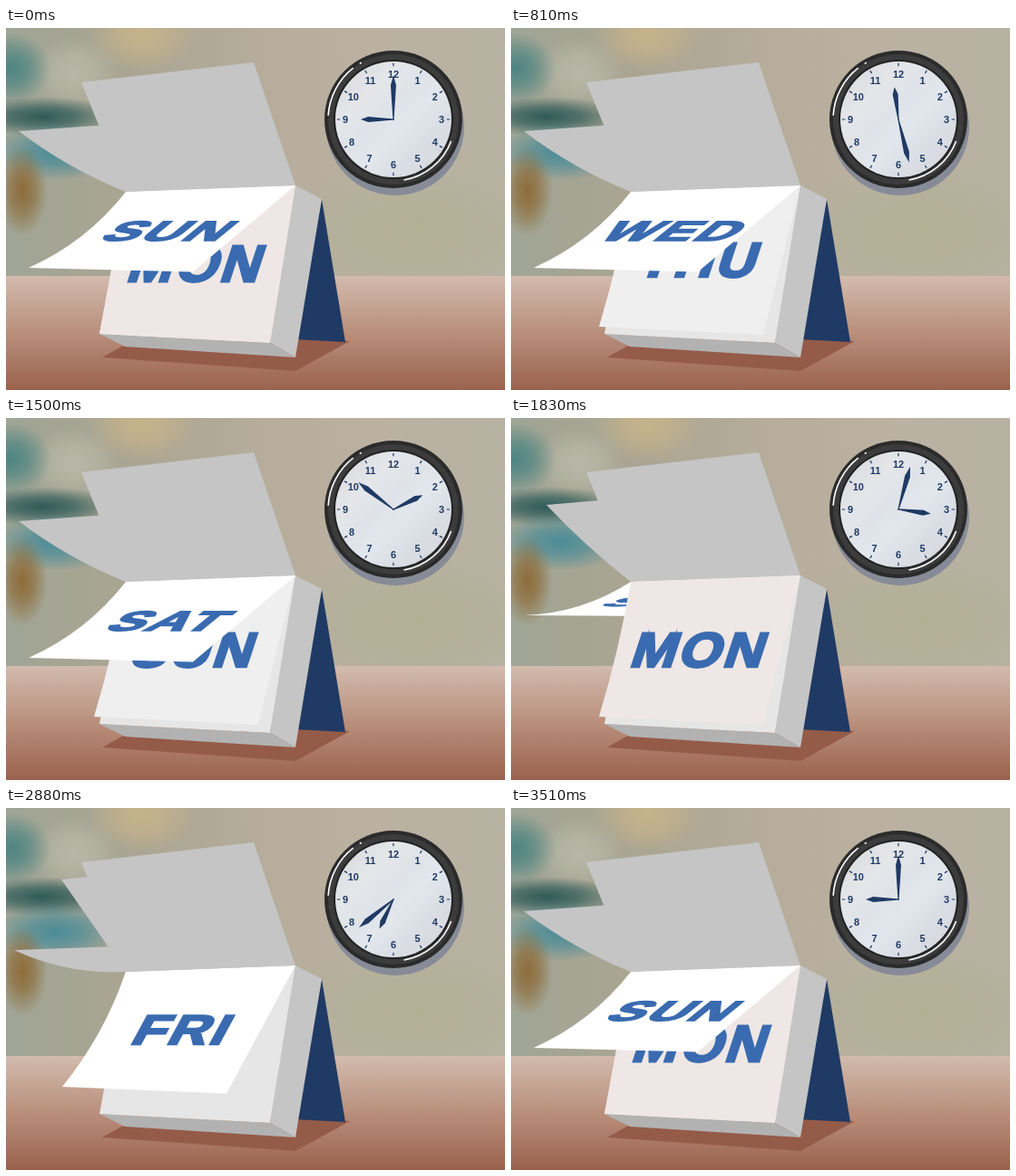
Write an HTML page with a canvas that moves like this. It is 550 by 400 pixels and loops after 3.54 s.

```html
<!DOCTYPE html>
<html lang="en">
<head>
<meta charset="utf-8">
<title>Days passing</title>
<style>
html, body { margin: 0; width: 100%; height: 100%; overflow: hidden; }
canvas { display: block; }
</style>
</head>
<body>
<canvas id="stage" width="550" height="400"></canvas>
<script>
const STEP = 30, STEPS = 118, POSES = 29, DAY_POSES = 4;
const NAVY = '#1f3a64', INK = '#3a6bb0', GRAY = '#c5c5c5', PINK = '#efe7e5';
const DAYS = ['MON', 'TUE', 'WED', 'THU', 'FRI', 'SAT', 'SUN'];
const HINGE_L = [132, 181], HINGE_R = [319, 174];
const CLOCK = { x: 427, y: 101 };

// Path of a sheet's free left corner, one point per pose
const CORNERS = [
  [103, 338], [97, 330], [82, 322], [62, 308], [50, 295], [25, 265],
  [15, 218], [9, 157], [9, 133], [14, 114], [39, 96], [61, 79]
];
const FIRST_BACK = 7;

const stage = document.getElementById('stage').getContext('2d');
const backdrop = document.createElement('canvas');
backdrop.width = 550;
backdrop.height = 400;

function polygon(c, fill, ...points) {
  c.fillStyle = fill;
  c.beginPath();
  points.forEach(p => c.lineTo(...p));
  c.fill();
}

function disc(c, x, y, r, fill) {
  c.fillStyle = fill;
  c.beginPath();
  c.arc(x, y, r, 0, 2 * Math.PI);
  c.fill();
}

function arc(c, r, from, to, width) {
  c.lineWidth = width;
  c.beginPath();
  c.arc(CLOCK.x, CLOCK.y, r, from, to);
  c.stroke();
}

function gradient(c, line, ...colors) {
  const g = c.createLinearGradient(...line);
  colors.forEach((color, i) => g.addColorStop(i / (colors.length - 1), color));
  return g;
}

function blob(c, color, x, y, rx, ry) {
  const g = c.createRadialGradient(0, 0, 0, 0, 0, 1);
  g.addColorStop(0, color);
  g.addColorStop(.45, color + 'b0');
  g.addColorStop(1, color + '00');
  c.save();
  c.translate(x, y);
  c.scale(rx, ry);
  disc(c, 0, 0, 1, g);
  c.restore();
}

function drawRoom(c) {
  c.fillStyle = gradient(c, [0, 0, 550, 0], '#a0a595', '#aaa592', '#b5ac9b', '#bab1a1', '#b8b2a2');
  c.fillRect(0, 0, 550, 274);
  blob(c, '#b1b095', 455, 225, 150, 80);
  blob(c, '#c6b38a', 150, 8, 60, 40);
  blob(c, '#b9b8a8', 75, 50, 50, 40);
  blob(c, '#4d8582', 5, 45, 45, 40);
  blob(c, '#2f5b58', 40, 98, 85, 22);
  blob(c, '#4b8c98', 55, 137, 70, 32);
  blob(c, '#8d6c3a', 18, 180, 28, 50);
  c.fillStyle = gradient(c, [0, 274, 0, 400], '#d2bbad', '#b98f7c', '#9a624d');
  c.fillRect(0, 274, 550, 126);
}

function drawClock(c) {
  const { x, y } = CLOCK;
  disc(c, x + 2, y + 8, 76, '#868b97');
  disc(c, x, y, 76, '#2b2b2b');
  disc(c, x, y, 72, '#3c3c3c');
  disc(c, x, y, 66, '#222');
  disc(c, x, y, 64, gradient(c, [380, 55, 474, 147],
    '#dcdee2', '#e4e6e9', '#dfe3e8', '#e2e7ed', '#dadee5', '#d8dade'));
  c.strokeStyle = '#fff';
  arc(c, 72, 3.2, 4.05, 1.6);
  arc(c, 72, 4.17, 4.2, 1.6);
  arc(c, 68, .36, 1.4, 1.6);
  c.strokeStyle = c.fillStyle = NAVY;
  c.font = 'bold 11px "Liberation Sans", Arial, sans-serif';
  c.textAlign = 'center';
  for (let h = 1; h <= 12; h++) {
    const angle = h * Math.PI / 6 - Math.PI / 2;
    const r = 55 - 2 * String(h).length;
    arc(c, 60.5, angle - .01, angle + .01, 3.5);
    c.fillText(h, x + Math.cos(angle) * r, y + Math.sin(angle) * 50 + 4);
  }
}

function drawCalendar(c) {
  polygon(c, '#945b49', [106, 364], [131, 350], [323, 343], [379, 346], [319, 379]);
  polygon(c, NAVY, [348, 189], [374, 347], [318, 344]);
  polygon(c, GRAY, [83, 60], [273, 38], HINGE_R, HINGE_L);
  polygon(c, GRAY, HINGE_R, [348, 189], [319, 364], [291, 348]);
  polygon(c, '#b2b2b2', [103, 338], [291, 348], [319, 364], [131, 352]);
  polygon(c, '#e6e6e6', HINGE_L, HINGE_R, [291, 348], [103, 338]);
}

function sheetColor(day, age) {
  if (age >= FIRST_BACK) return GRAY;
  if (day === 0 && age < 2) return PINK;
  const light = Math.min(255, 231 + 8 * age);
  return `rgb(${light}, ${light}, ${light})`;
}

function drawSheet(c, day, age) {
  const [lx, ly] = CORNERS[age];
  const isFront = age < FIRST_BACK;
  const rx = lx + (age ? 181 : 188);
  const ry = ly + (ly - 200) * (isFront ? .07 : .15);

  // The left edge bows out at right angles to its chord
  const dx = lx - HINGE_L[0], dy = ly - HINGE_L[1];
  const bow = 17 * Math.sin(Math.PI * age / 11) / Math.hypot(dx, dy);
  const bowX = dy * bow, bowY = -dx * bow;

  c.fillStyle = sheetColor(day, age);
  c.beginPath();
  c.moveTo(...HINGE_L);
  c.quadraticCurveTo(HINGE_L[0] + dx / 2 + bowX, HINGE_L[1] + dy / 2 + bowY, lx, ly);
  c.lineTo(rx, ry);
  c.lineTo(...HINGE_R);
  c.fill();
  if (isFront) {
    const top = [(HINGE_L[0] + HINGE_R[0]) / 2, (HINGE_L[1] + HINGE_R[1]) / 2];
    const fall = [(lx + rx) / 2 - top[0], (ly + ry) / 2 - top[1]];
    const along = .5 - .002 * age * age;
    drawLabel(c, DAYS[day], top[0] + fall[0] * along + bowX / 2,
      top[1] + fall[1] * along + bowY / 2, fall);
  }
}

// Lays the word on the plane of a sheet that falls along the given vector
function drawLabel(c, word, x, y, [fallX, fallY]) {
  const squash = fallY / 175;
  const shear = Math.max(.33, -fallX / fallY);
  c.save();
  c.transform(1, 0, -shear * squash, squash, x, y);
  c.font = 'bold 60px "Liberation Sans", Arial, sans-serif';
  c.letterSpacing = '3px';
  c.textAlign = 'center';
  c.lineWidth = 3;
  c.fillStyle = c.strokeStyle = INK;
  c.fillText(word, 1, 21);
  c.strokeText(word, 1, 21);
  c.restore();
}

function drawHand(c, turns, length) {
  const widest = length * .77;
  c.save();
  c.translate(CLOCK.x, CLOCK.y);
  c.rotate(turns * 2 * Math.PI);
  polygon(c, NAVY, [-.5, 1], [-3, -widest], [0, -length], [3, -widest], [.5, 1]);
  c.restore();
}

function draw(step) {
  const pose = Math.floor(step / 2) % POSES;
  const progress = step / (STEPS - 1);
  stage.drawImage(backdrop, 0, 0);
  if (pose === 0) drawSheet(stage, 0, 0);
  for (let day = 6; day >= 0; day--) {
    const age = (pose - DAY_POSES * day + POSES) % POSES;
    if (age > 0 && age < CORNERS.length) drawSheet(stage, day, age);
  }
  drawHand(stage, .75 + progress, 36);
  drawHand(stage, 2 * progress, 49);
}

const scene = backdrop.getContext('2d');
drawRoom(scene);
drawClock(scene);
drawCalendar(scene);

const start = performance.now();
function tick() {
  draw(Math.floor((performance.now() - start) / STEP) % STEPS);
  requestAnimationFrame(tick);
}
tick();
</script>
</body>
</html>
```
